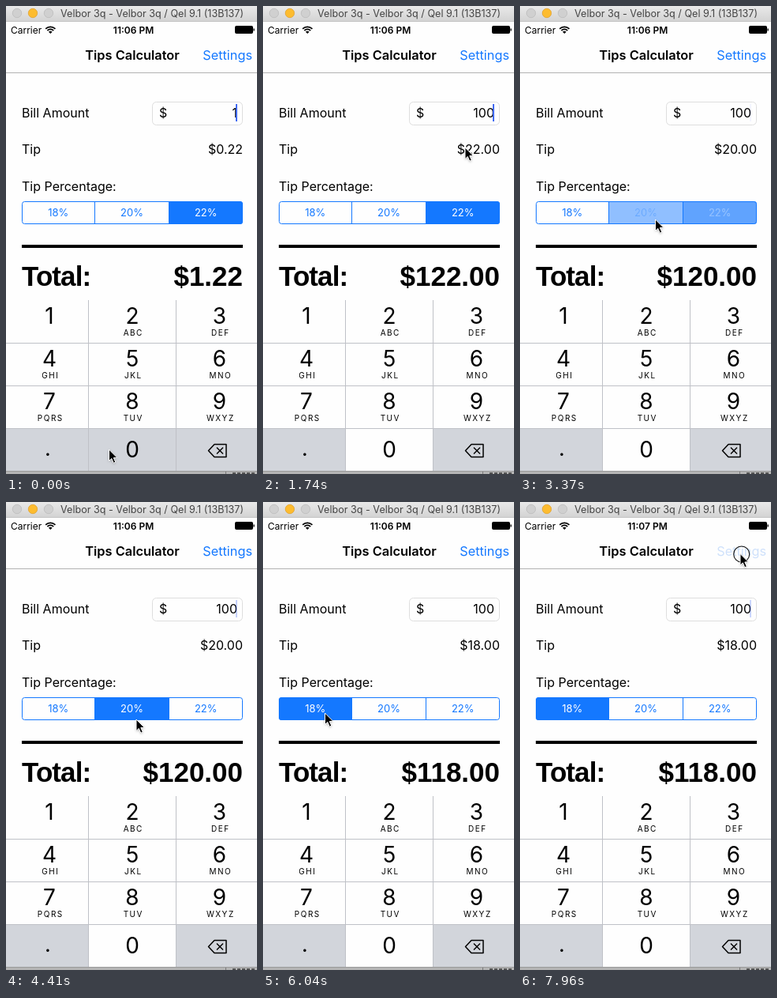
An HTML page with a canvas for the animation above (8 s loop, 318 px wide and 592 px high).

```html
<!DOCTYPE html>
<html lang="en">
<head>
<meta charset="utf-8">
<title>Tips Calculator</title>
<style>
  html, body { margin: 0; width: 100%; height: 100%; overflow: hidden; background: #fff; }
  canvas { display: block; width: 318px; height: 592px; }
</style>
</head>
<body>
<canvas></canvas>
<script>
const W = 318, H = 592, LOOP = 8000, BEAT = 148;
const BLUE = '#1478ff', GRAY = '#d2d5db';
const UI = 'Inter, sans-serif', HEAVY = '"Liberation Sans", Arial, sans-serif';
const canvas = document.querySelector('canvas'), ctx = canvas.getContext('2d');
const ratio = window.devicePixelRatio || 1;
canvas.width = W * ratio;
canvas.height = H * ratio;

// Pointer stops: beat, x, y
const PATH = [
  [0, 130.5, 561], [6, 130.5, 561], [8, 142, 398], [10, 240, 215], [12, 256, 179], [15, 256, 179],
  [21, 171.5, 270], [26, 171.5, 270], [30, 165, 275], [33, 165, 275], [37, 78.5, 267],
  [42, 78.5, 267], [47, 284.5, 148], [50, 284, 78], [53, 279, 65.5]
];
const CLICKS = [22, 38, 54];
const KEYS = ['', 'ABC', 'DEF', 'GHI', 'JKL', 'MNO', 'PQRS', 'TUV', 'WXYZ'];
const KEY_X = [55, 160, 270.5];

const clamp = v => Math.min(1, Math.max(0, v));

function rect(x, y, w, h, color) {
  ctx.fillStyle = color;
  ctx.fillRect(x, y, w, h);
}

function text(str, x, y, size, { color = '#000', align = 'left', weight = 400, font = UI, spacing = 0 } = {}) {
  ctx.font = `${weight} ${size}px ${font}`;
  ctx.letterSpacing = spacing + 'px';
  ctx.textAlign = align;
  ctx.fillStyle = color;
  ctx.fillText(str, x, y);
}

function path(points, closed) {
  ctx.beginPath();
  points.forEach(([x, y]) => ctx.lineTo(x, y));
  if (closed) ctx.closePath();
}

function stroke(color, width = 1) {
  ctx.strokeStyle = color;
  ctx.lineWidth = width;
  ctx.stroke();
}

function roundRect(x, y, w, h, r) {
  ctx.beginPath();
  ctx.roundRect(x, y, w, h, r);
}

function circle(x, y, r) {
  ctx.beginPath();
  ctx.arc(x, y, r, 0, 2 * Math.PI);
}

function drawWindow() {
  const shade = ctx.createLinearGradient(0, 0, 0, 20);
  shade.addColorStop(0, '#e9e9e9');
  shade.addColorStop(1, '#d2d2d2');
  rect(0, 0, W, 20, shade);
  rect(0, 19, W, 1, '#c4c4c4');
  ['#d0d0d0', '#fdbc2f', '#d0d0d0'].forEach((color, i) => {
    circle(14 + 20 * i, 9, 5.7);
    ctx.fillStyle = color;
    ctx.fill();
    stroke(i === 1 ? '#e0a230' : '#bcbcbc', 0.8);
  });
  text('Velbor 3q - Velbor 3q / Qel 9.1 (13B137)', 69, 14, 12.6, { color: '#444' });
}

function drawHeader(beat) {
  text('Carrier', 6, 34.5, 12);
  ctx.save();
  ctx.beginPath();
  ctx.moveTo(56.3, 35);
  ctx.arc(56.3, 35, 12, -Math.PI * 0.75, -Math.PI * 0.25);
  ctx.clip();
  [8.2, 5.2].forEach(r => { circle(56.3, 34.5, r); stroke('#000', 1.7); });
  circle(56.3, 34.5, 2.8);
  ctx.fillStyle = '#000';
  ctx.fill();
  ctx.restore();
  text(beat < 51 ? '11:06 PM' : '11:07 PM', 161.5, 34.5, 12, { align: 'center', weight: 600 });
  roundRect(290, 25, 23, 10, 2);
  ctx.fillStyle = '#000';
  ctx.fill();
  rect(313.5, 28.5, 1.3, 3, '#000');

  text('Tips Calculator', 160, 68, 16.4, { align: 'center', weight: 600 });
  text('Settings', 312, 68, 16.3, { align: 'right', color: beat < 54 ? BLUE : '#cfe1fb' });
  rect(0, 84, W, 1, '#b2b2b2');
}

function caretAlpha(time) {
  if (time < 900) return 1;
  const phase = time / 1000 % 1;
  return phase < 0.7 ? clamp((phase - 0.36) / 0.14) : clamp((1 - phase) / 0.16);
}

function segmentLevels(beat) {
  if (beat < 22) return [0, 0, 1];
  if (beat === 22) return [0, 0.15, 1];
  if (beat === 23) return [0, 0.47, 0.67];
  if (beat < 38) return [0, 1, 0];
  if (beat === 38) return [0.15, 1, 0];
  if (beat === 39) return [0.47, 0.67, 0];
  return [1, 0, 0];
}

function drawSegments(beat) {
  const edges = [20, 112.5, 206.5, 300];
  ctx.save();
  roundRect(20, 247, 280, 29, 3.5);
  ctx.clip();
  segmentLevels(beat).forEach((level, i) => {
    const label = 18 + 2 * i + '%', middle = (edges[i] + edges[i + 1]) / 2;
    ctx.globalAlpha = level;
    rect(edges[i], 247, edges[i + 1] - edges[i], 29, BLUE);
    text(label, middle, 266, 13, { align: 'center', color: '#fff' });
    ctx.globalAlpha = 1 - level;
    text(label, middle, 266, 13, { align: 'center', color: BLUE });
  });
  ctx.restore();
  roundRect(20.5, 247.5, 279, 28, 3);
  stroke(BLUE);
  rect(112, 247, 1, 29, BLUE);
  rect(206, 247, 1, 29, BLUE);
}

function drawForm(beat, time) {
  const bill = beat < 1 ? 1 : beat < 3 ? 10 : 100;
  const rate = beat < 23 ? 0.22 : beat < 39 ? 0.2 : 0.18;
  const money = v => '$' + v.toFixed(2);

  text('Bill Amount', 20, 141, 16);
  roundRect(185.5, 121.5, 114, 29, 5);
  stroke('#dedede');
  text('$', 194, 141, 16);
  text(bill, 293, 141, 16, { align: 'right' });
  ctx.globalAlpha = caretAlpha(time);
  rect(291, 124, 2, 22, '#426bf2');
  ctx.globalAlpha = 1;

  text('Tip', 20, 187, 16);
  text(money(bill * rate), 300, 187, 16, { align: 'right' });
  text('Tip Percentage:', 20, 234, 16);
  drawSegments(beat);
  rect(20, 302, 280, 4, '#000');

  const total = { weight: 700, font: HEAVY };
  text('Total:', 20, 354, 35, { ...total, spacing: -0.9 });
  text(money(bill * (1 + rate)), 300, 354, 35, { ...total, align: 'right' });
}

function drawKeypad(beat) {
  const zeroDown = beat === 0 || beat === 2;
  rect(0, 534, 104, 54, GRAY);
  rect(215, 534, 103, 54, GRAY);
  if (zeroDown) rect(104, 534, 111, 54, GRAY);
  [426, 480, 534].forEach(y => rect(0, y, W, 1, '#bfc1c7'));
  [104, 215].forEach(x => rect(x, 372, 1, 216, '#bfc1c7'));

  KEYS.forEach((letters, i) => {
    const x = KEY_X[i % 3], y = 402 + 54 * Math.floor(i / 3);
    text(i + 1, x, y, 28, { align: 'center' });
    text(letters, x + 1.3, y + 15, 10, { align: 'center', spacing: 1.5 });
  });
  text('0', 160, 571, 28, { align: 'center' });
  text('.', 53, 569, 27, { align: 'center' });

  ctx.lineJoin = 'round';
  path([[256.5, 562.5], [264, 554.5], [279, 554.5], [279, 570.5], [264, 570.5]], true);
  stroke('#000', 1.5);
  path([[267, 558.5], [275, 566.5]]);
  stroke('#000', 1.5);
  path([[275, 558.5], [267, 566.5]]);
  stroke('#000', 1.5);

  rect(0, 588, W, 4, '#b5b5b5');
  rect(0, 588, W, 1, '#999');
  rect(278, 589, 1, 3, '#777');
  for (let x = 287; x < 316; x += 6) rect(x, 590, 4, 2, '#555');
}

function pointerAt(beat) {
  const next = PATH.findIndex(stop => stop[0] > beat);
  if (next < 0) return PATH[PATH.length - 1].slice(1);
  const [b0, x0, y0] = PATH[next - 1], [b1, x1, y1] = PATH[next];
  const u = (beat - b0) / (b1 - b0), ease = u * u * (3 - 2 * u);
  return [x0 + (x1 - x0) * ease, y0 + (y1 - y0) * ease];
}

function drawPointer(beat) {
  const [x, y] = pointerAt(beat);
  if (CLICKS.includes(beat)) {
    circle(x + 1.7, y + 0.5, 10);
    stroke('#111', 1.1);
  }
  ctx.save();
  ctx.translate(x, y);
  path([[0, 0], [0, 14.5], [3.3, 11.4], [5.8, 17.2], [8.3, 16.1], [5.8, 10.5], [10.3, 10.3]], true);
  ctx.shadowColor = 'rgba(0,0,0,.35)';
  ctx.shadowBlur = 3 * ratio;
  ctx.shadowOffsetY = ratio;
  ctx.fillStyle = '#000';
  ctx.fill();
  ctx.shadowColor = 'transparent';
  stroke('#fff', 1);
  ctx.restore();
}

function draw(now) {
  const beat = Math.floor((now % LOOP + 36) / BEAT);
  ctx.setTransform(ratio, 0, 0, ratio, 0, 0);
  rect(0, 0, W, H, '#fefefe');
  drawWindow();
  drawHeader(beat);
  drawForm(beat, Math.max(0, beat * BEAT - 36));
  drawKeypad(beat);
  drawPointer(beat);
}

const start = performance.now();
function tick() {
  draw(performance.now() - start);
  requestAnimationFrame(tick);
}
tick();
</script>
</body>
</html>
```
